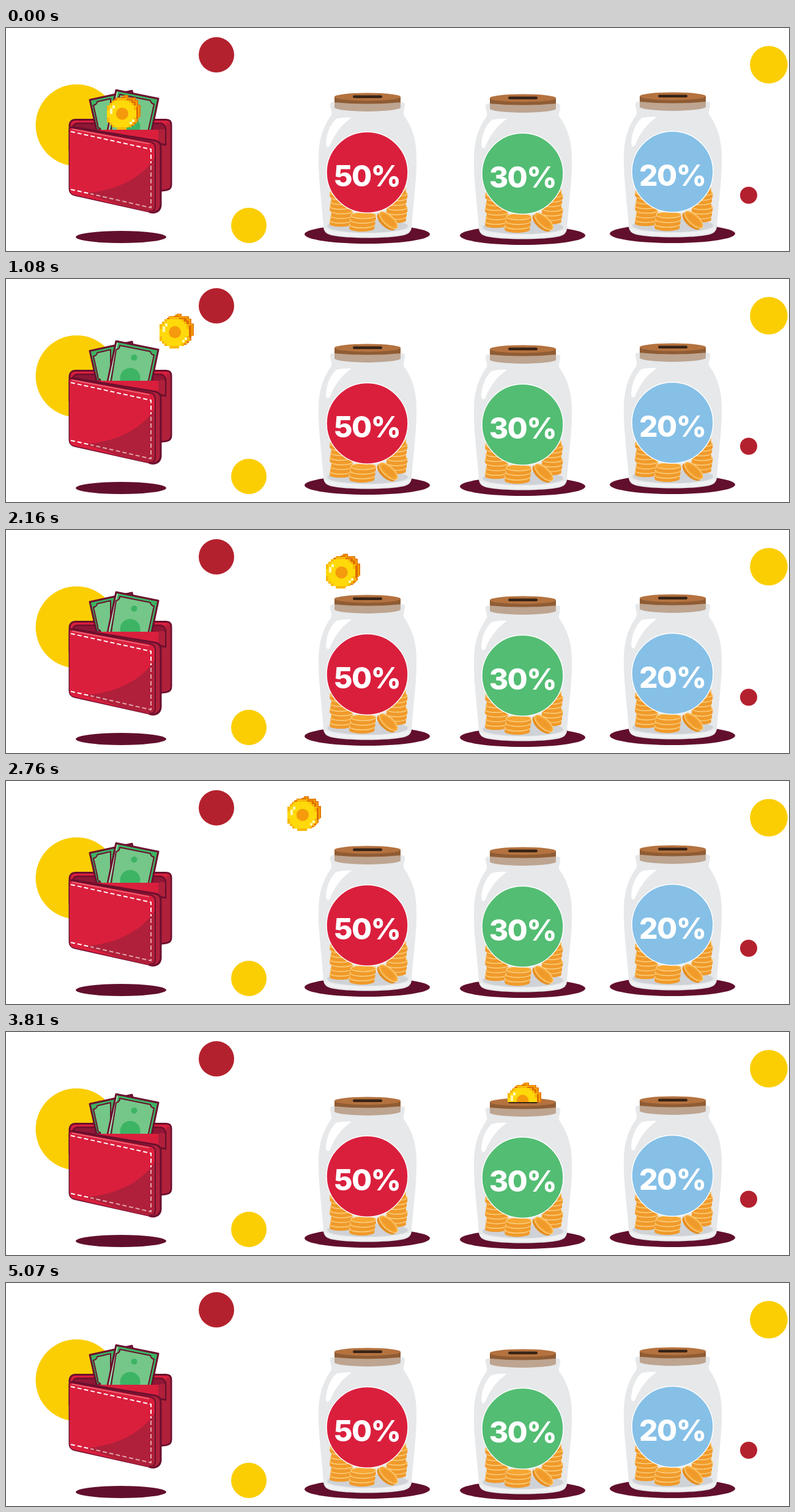
Write an HTML page that moves like this. It is 1280 px wide and 366 px high and loops after 5100 ms.

```html
<!DOCTYPE html>
<html lang="en">
<head>
<meta charset="utf-8">
<title>Savings jars</title>
<style>
  html, body { margin: 0; width: 100%; height: 100%; overflow: hidden; background: #fff; }
  svg { display: block; width: 100%; height: 100%; }
  text { font: 800 48px Inter, "Open Sans", sans-serif; letter-spacing: -1.6px; fill: #fff; text-anchor: middle; }
</style>
</head>
<body>
<svg id="stage" viewBox="0 0 1280 366">
  <defs>
    <clipPath id="pocket"><path d="M100 90H280V167H100Z"/></clipPath>
    <clipPath id="front"><path d="M104 168Q104 162 111 164L237 187Q244 189 244 197V294Q244 304 235 302L112 274Q104 272 104 264Z"/></clipPath>
    <g id="coin" shape-rendering="crispEdges"></g>
    <g id="savings"></g>
    <g id="glass">
      <ellipse cx="590.5" cy="338.5" rx="102.5" ry="15.5" fill="#620f2d"/>
      <path fill="#e6e8ea" d="M533 122H649Q653 123 652 128L650 138Q649 141 651 144C665 164 671 186 671 212C672 246 665 292 663 328Q662 337 651 340C625 346 557 346 531 340Q520 337 519 328C517 292 510 246 511 212C511 186 517 164 531 144Q533 141 532 138L530 128Q529 123 533 122Z"/>
      <path fill="#f0f1f3" d="M521 329Q521 336 532 338C560 344 622 344 650 338Q661 335 661 328C640 340 542 340 521 329Z"/>
      <ellipse cx="591" cy="325" rx="66" ry="11" fill="#cfd2d6"/>
      <path fill="#fff" d="M540 149Q552 146 565 147C548 159 537 174 529 194Q524 198 523 190C524 172 530 158 540 149Z"/>
      <use href="#savings"/>
      <path fill="#8f5c34" d="M537 113H645V125Q591 131 537 125Z"/>
      <path fill="#bda591" d="M537 122Q591 127 645 122V131Q638 136 591 137Q544 136 537 131Z"/>
      <ellipse cx="591" cy="113" rx="54" ry="6.5" fill="#b4723f"/>
      <rect x="567" y="110.500" width="48" height="4.600" rx="2.300" fill="#382316"/>
    </g>
  </defs>

  <rect width="1280" height="366" fill="#fff"/>
  <g fill="#fbce04">
    <circle cx="115.500" cy="159.500" r="67"/>
    <circle cx="397" cy="324" r="29"/>
    <circle cx="1247" cy="60.300" r="30.800"/>
  </g>
  <g fill="#b4212e">
    <circle cx="344" cy="44" r="29"/>
    <circle cx="1214" cy="274.500" r="14"/>
  </g>
  <ellipse cx="188" cy="343" rx="74" ry="10" fill="#620f2d"/>

  <g id="wallet" stroke-linejoin="round">
    <path fill="#da1f3d" stroke="#6b0f2e" stroke-width="3" d="M113 150.500H262Q270 150.500 270 159V257Q270 265 262 266L240 269L104 200V159Q105 151 113 150.500Z"/>
    <path fill="#b0203a" d="M262 156Q268 154 268.500 160V257Q268 264 262 264.500L250 266V180H262Z"/>
    <path fill="#8f1735" stroke="#6b0f2e" stroke-width="2.500" d="M116 156.500H252Q261 157 261 167V192L112 166Q106 159 116 156.500Z"/>
    <path fill="#da1f3d" d="M116 167H250V188L116 166Z"/>
    <path fill="#b0203a" d="M249 167Q256 164 260 167V190L249 187Z"/>
    <g clip-path="url(#pocket)" stroke="#6b0f2e">
      <path fill="#3cb464" stroke-width="3" d="M137 118L206 103L219 167H148Z"/>
      <path fill="#74c788" stroke-width="2" d="M143 127Q149 125 149 121L171 116V180H158L154 165Q149 163 150 159Z"/>
      <path fill="#3cb464" stroke-width="3" d="M180 102L249 116L236 178H164Z"/>
      <path d="M182 105L166 178" fill="none" stroke="#c9ead0" stroke-width="1.500"/>
      <path fill="#74c788" stroke-width="2" d="M186 109L236 119Q237 124 242 125L230 180H170L180 116Q186 115 186 109Z"/>
      <g fill="#3cb464" stroke="none">
        <circle cx="209.500" cy="129" r="5"/>
        <circle cx="203" cy="162.500" r="16.500"/>
      </g>
    </g>
    <path fill="#b0203a" stroke="#6b0f2e" stroke-width="3" d="M104 168Q104 161 112 163L245 185Q253 187 253 196V291Q252 302 240 303Q236 303 233 301L112 274Q104 272 104 264Z"/>
    <g clip-path="url(#front)">
      <path fill="#da1f3d" d="M100 155H248V310H100Z"/>
      <path fill="#b0203a" d="M248 204C232 238 190 267 128 271L240 308H248Z"/>
    </g>
    <path fill="none" stroke="#6b0f2e" stroke-width="2" d="M106 163L236 187Q244 189 244 197V292Q244 302 234 301"/>
    <path fill="none" stroke="#ef6f7f" stroke-width="1.500" d="M108 166L234 190"/>
    <g fill="none" stroke="#fff" stroke-width="2" stroke-dasharray="7 4">
      <path d="M106 170L237 199V222"/>
      <path d="M106 265L138 272"/>
      <path stroke="#e2a5ad" d="M237 226V295L138 272"/>
    </g>
  </g>

  <g id="jars"></g>
  <g id="flights"></g>
</svg>

<script>
const $ = id => document.getElementById(id);
const LOOP = 5100, STEP = 30, PERIOD = 780;
const CELL = 4, GRAVITY = 0.0019;

const jars = [
  { dx: 0,   dy: 0,  label: '50%', color: '#da1f3d', peak: 55, lip: 119 },
  { dx: 254, dy: 2,  label: '30%', color: '#53bd73', peak: 47, lip: 115 },
  { dx: 499, dy: -1, label: '20%', color: '#86c0e7', peak: 44, lip: 113 }
];
const targets = [0, 0, 0, 1, 1, 2];

const clamp = v => Math.min(1, Math.max(0, v));
const smooth = v => v * v * (3 - 2 * v);

// Disc made of square cells
function pixelDisc(x, y, r, fill) {
  let d = '';
  const n = Math.floor(r / CELL);
  for (let row = -n; row <= n; row++) {
    const w = Math.round(Math.sqrt(r * r - (row * CELL) ** 2) / CELL) * CELL;
    d += `M${x - w} ${y + row * CELL - CELL / 2}h${2 * w}v${CELL}h${-2 * w}z`;
  }
  return `<path d="${d}" fill="${fill}"/>`;
}

function coinArt() {
  const rim = ['#e77a00', '#f7a400', '#e06c00'];
  let art = '';
  rim.forEach((c, i) => { art += pixelDisc(4.5 - i * 2, -2.5 + i * 1.5, 24.5, c); });
  art += pixelDisc(-3, 2.5, 25.5, '#f9b808') + pixelDisc(-3, 2.5, 22.5, '#ffd90a');
  art += '<path fill="#fff7b8" d="M-22-7h4v9h-4zM-18-12h4v5h-4zM10 15h4v4h-4zM14 11h4v4h-4z"/>';
  return art + '<circle cx="-2" cy="2" r="10" fill="#f59a0c" shape-rendering="auto"/>';
}

// Pile of coins rising from its lowest disc
function stack(x, y, rx, count) {
  let art = '';
  for (let i = 0; i < count; i++) {
    const cy = y - i * 7.6, cx = x + (i % 3 - 1) * 1.2, ry = rx * 0.25;
    art += `<path fill="#f09a2b" d="M${cx - rx} ${cy - 6}v6a${rx} ${ry} 0 0 0 ${2 * rx} 0v-6z"/>
      <ellipse cx="${cx}" cy="${cy - 6}" rx="${rx}" ry="${ry}" fill="#f6a632" stroke="#fbd38a" stroke-width="1.2"/>`;
  }
  return art;
}

function savingsArt() {
  return stack(548, 322, 17.5, 8) + stack(638, 316, 17, 7) + stack(583, 329, 20.5, 3) +
    `<g transform="rotate(42 624 317)">
      <ellipse cx="623" cy="319" rx="19" ry="9" fill="#e58e20"/>
      <ellipse cx="624" cy="315" rx="19" ry="8" fill="#f6a632" stroke="#fbd38a" stroke-width="1.2"/>
      <ellipse cx="624" cy="315" rx="14" ry="5" fill="#f09a2b"/>
    </g>`;
}

$('coin').innerHTML = coinArt();
$('savings').innerHTML = savingsArt();
$('jars').innerHTML = jars.map(j => `<g transform="translate(${j.dx} ${j.dy})"><g class="jar">
  <use href="#glass"/>
  <circle cx="590.5" cy="237" r="66.5" fill="${j.color}" stroke="#fff" stroke-width="1.4"/>
  <text x="590.3" y="260">${j.label}</text></g></g>`).join('');
$('flights').innerHTML = jars.map((j, i) =>
  `<clipPath id="lip${i}"><rect width="1280" height="${j.lip}"/><rect width="${530 + j.dx}" height="366"/></clipPath>`
).join('') + targets.map(k => `<g clip-path="url(#lip${k})"><use class="coin" href="#coin"/></g>`).join('');

const jarNodes = document.querySelectorAll('.jar');
const coinNodes = document.querySelectorAll('.coin');

function coinAt(p, jar) {
  const u = clamp((p + 60) / 717);
  const along = (u * u + smooth(u ** 1.88)) / 2;
  const top = 690 - Math.sqrt((111 - jar.peak) / GRAVITY);
  const y = p < top
    ? 139 + (jar.peak - 139) * smooth(clamp((p + 20) / (top + 20)))
    : jar.peak + GRAVITY * (p - top) ** 2;
  return [190.5 + (402 + jar.dx) * along, y];
}

function wobble(p) {
  const t = p - 705;
  return t > 0 && t < 330 ? -5.7 * Math.sin(t * Math.PI / 90) * (1 - t / 330) : 0;
}

function draw(time) {
  const tilt = [0, 0, 0];
  targets.forEach((k, i) => {
    const p = time - i * PERIOD;
    const [x, y] = coinAt(p, jars[k]);
    const shown = p >= -60 && y < jars[k].lip + 30;
    coinNodes[i].setAttribute('visibility', shown ? 'visible' : 'hidden');
    if (shown) coinNodes[i].setAttribute('transform', `translate(${x.toFixed(2)} ${y.toFixed(2)})`);
    tilt[k] += wobble(p);
  });
  jarNodes.forEach((n, k) => n.setAttribute('transform', `rotate(${tilt[k].toFixed(3)} 591 232)`));
}

const start = performance.now();
function tick() {
  const time = (performance.now() - start) % LOOP;
  draw(Math.floor(time / STEP) * STEP);
  requestAnimationFrame(tick);
}
tick();
</script>
</body>
</html>
```
